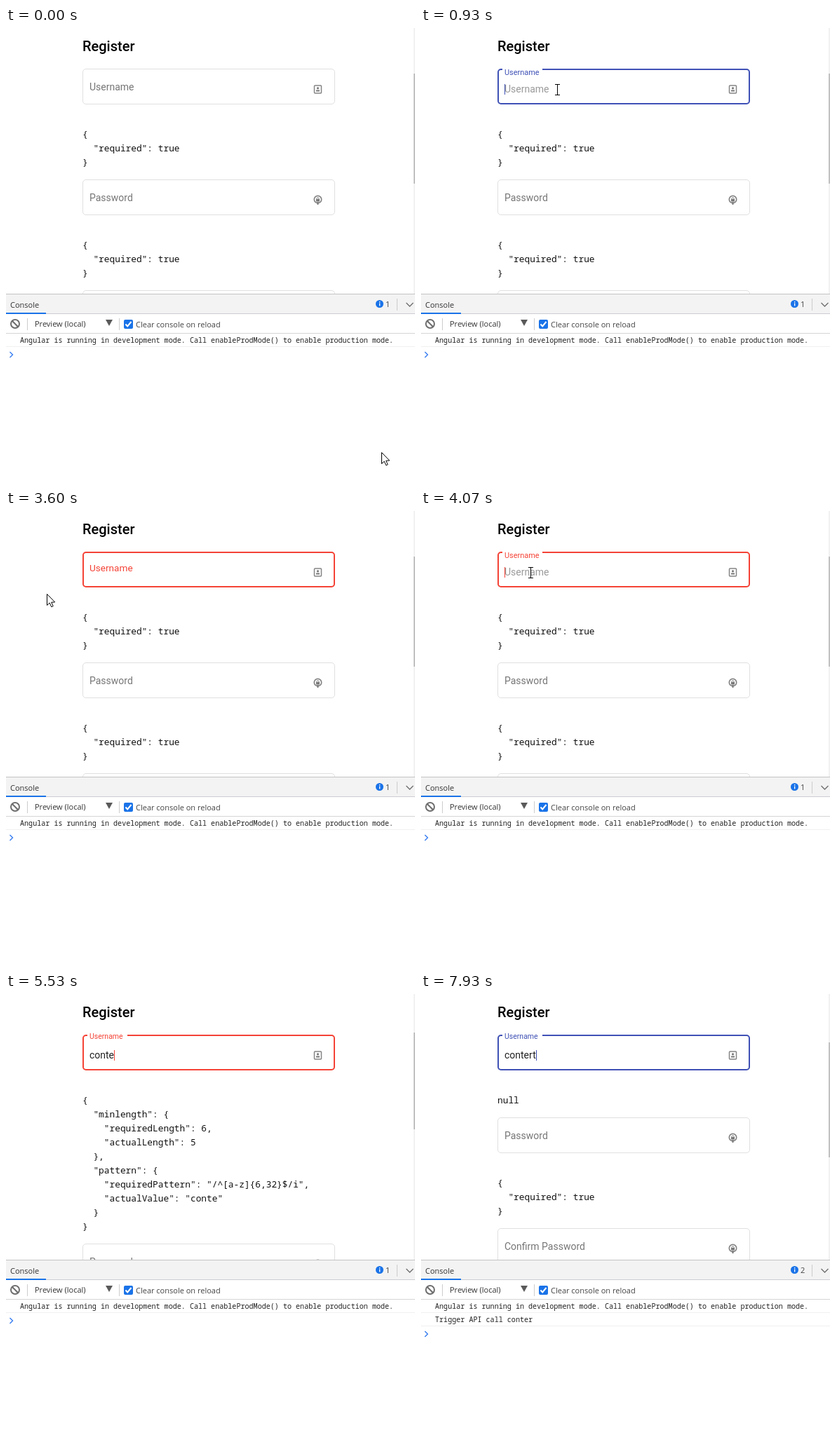
An HTML page with a canvas for the animation above (8000 ms loop, 583 by 649 pixels).

```html
<!DOCTYPE html>
<html lang="en">
<head>
<meta charset="utf-8">
<title>Register form</title>
<style>
  html, body { margin: 0; width: 100%; height: 100%; overflow: hidden; background: #fff; }
  canvas { display: block; width: 583px; height: 649px; }
</style>
</head>
<body>
<canvas id="stage" width="583" height="649"></canvas>
<script>
const g = document.getElementById('stage').getContext('2d');

const LOOP = 8000, TICK = 1000 / 15;
const UI = '"Open Sans", sans-serif', BODY = 'Roboto, sans-serif', MONO = '"Noto Sans Mono", monospace';
const PRIMARY = '#3f51b5', WARN = '#f44336', INK = 'rgba(0,0,0,.87)', BLUE = '#1a73e8';

// All moments below are counted in ticks of 1/15 s.
const FOCUS = 12, BLUR = 52, REFOCUS = 59, API_CALL = 90, BLINK = 8;
const NAME = 'contert';
const KEYS = [72, 78, 79, 80, 83, 85, 119];
const VALID_LENGTH = 6;

// Pointer trips: [tick, x, y]
const TRIPS = [
  [[0, 535, 605], [1, 528, 590], [3, 430, 390], [5, 285, 185], [7, 208, 101], [8, 198, 90],
   [10, 194, 88], [16, 194, 88], [18, 168, 95], [20, 104, 114], [22, 67, 125]],
  [[50, 0, 129], [51, 27, 124], [52, 50, 120], [54, 58, 118], [56, 80, 111], [58, 142, 92],
   [59, 154, 88], [61, 156, 88], [62, 150, 89], [63, 88, 113], [64, 16, 129]]
];

function bezier(x, x1, y1, x2, y2) {
  if (x <= 0) return 0;
  if (x >= 1) return 1;
  const at = (s, a, b) => 3 * (1 - s) ** 2 * s * a + 3 * (1 - s) * s * s * b + s ** 3;
  let lo = 0, hi = 1;
  for (let i = 0; i < 24; i++) {
    const mid = (lo + hi) / 2;
    if (at(mid, x1, x2) < x) lo = mid; else hi = mid;
  }
  return at(lo, y1, y2);
}

function text(str, x, y, font, color) {
  g.font = font;
  g.fillStyle = color;
  g.fillText(str, x, y);
}

function rect(x, y, w, h, color) {
  g.fillStyle = color;
  g.fillRect(x, y, w, h);
}

function line(points, color, width = 1, close = false) {
  g.beginPath();
  points.forEach(([x, y]) => g.lineTo(x, y));
  if (close) g.closePath();
  g.strokeStyle = color;
  g.lineWidth = width;
  g.stroke();
}

function disc(x, y, r, color) {
  g.beginPath();
  g.arc(x, y, r, 0, 7);
  g.fillStyle = color;
  g.fill();
}

function ring(x, y, r, color, width) {
  g.beginPath();
  g.arc(x, y, r, 0, 7);
  g.strokeStyle = color;
  g.lineWidth = width;
  g.stroke();
}

function outline(top, color, width) {
  g.beginPath();
  g.roundRect(109 + width / 2, top + width / 2, 360 - width, 51 - width, 5 - width / 2);
  g.strokeStyle = color;
  g.lineWidth = width;
  g.stroke();
}

function userIcon(x, y) {
  g.beginPath();
  g.roundRect(x - 5, y - 5.5, 10, 11, 1);
  g.strokeStyle = '#858585';
  g.lineWidth = 1.5;
  g.stroke();
  disc(x, y - 1.7, 1.6, '#777');
  rect(x - 2.5, y + 1, 5, 2, '#777');
}

function lockIcon(x, y) {
  ring(x, y - 0.5, 5.2, '#858585', 1.7);
  ring(x, y - 1.5, 1.6, '#777', 1);
  rect(x - 2.5, y - 1, 5, 3.5, '#777');
  rect(x - 1, y + 3, 2, 4, '#777');
}

function passwordField(label, top) {
  outline(top, '#e0e0e0', 1);
  text(label, 119, top + 31, '14px ' + BODY, 'rgba(0,0,0,.54)');
  lockIcon(444.5, top + 29);
}

function errors(lines, top) {
  lines.forEach((s, i) => text(s, 109, top + 98 + 20 * i, '12.83px ' + MONO, '#111'));
}

const REQUIRED = ['{', '  "required": true', '}'];

function nameErrors(value) {
  if (!value) return REQUIRED;
  if (value.length >= VALID_LENGTH) return ['null'];
  return ['{', '  "minlength": {', '    "requiredLength": 6,', `    "actualLength": ${value.length}`, '  },',
    '  "pattern": {', '    "requiredPattern": "/^[a-z]{6,32}$/i",', `    "actualValue": "${value}"`, '  }', '}'];
}

function pointerAt(k) {
  const trip = TRIPS.find(p => k >= p[0][0] && k <= p[p.length - 1][0]);
  if (!trip) return null;
  const i = Math.max(1, trip.findIndex(p => p[0] >= k));
  const [k0, x0, y0] = trip[i - 1], [k1, x1, y1] = trip[i];
  const u = (k - k0) / (k1 - k0);
  const x = Math.round(x0 + (x1 - x0) * u), y = Math.round(y0 + (y1 - y0) * u);
  return { x, y, inside: x >= 109 && x < 469 && y >= 58 && y < 109 };
}

function pointer({ x, y, inside }) {
  if (inside) {
    const stem = x + 0.5;
    line([[stem, y - 7], [stem, y + 8]], '#000');
    for (const end of [y - 7.5, y + 7.5]) line([[x - 3, end], [x + 4, end]], '#000');
    return;
  }
  const shape = [[0, 0], [0, 16], [3.7, 12.6], [6.3, 18.3], [8.7, 17.2], [6.2, 11.7], [11.2, 11.5]]
    .map(([dx, dy]) => [x + 0.5 + dx, y + 0.5 + dy]);
  g.beginPath();
  shape.forEach(([px, py]) => g.lineTo(px, py));
  g.fillStyle = '#fff';
  g.fill();
  line(shape, '#000', 1, true);
}

function nameField(k, value, mouse) {
  const focused = (k >= FOCUS && k < BLUR) || k >= REFOCUS;
  const invalid = k >= BLUR && value.length < VALID_LENGTH;
  const accent = invalid ? WARN : PRIMARY;
  const change = k >= REFOCUS ? REFOCUS : k >= BLUR ? BLUR : FOCUS;

  if (focused || invalid) outline(58, accent, 2);
  else {
    outline(58, '#e0e0e0', 1);
    if (mouse && mouse.inside) outline(58, k < 8 ? 'rgba(0,0,0,.45)' : INK, 2);
  }
  if (focused) rect(116, 57, 57, 4, '#fff');

  const moved = k < FOCUS ? 0 : bezier(((k - change) * TICK + 27) / 400, .25, .8, .25, 1);
  const up = change === BLUR ? 1 - moved : moved;
  text('Username', 119, 89 - 25 * up, `${14 - 3.5 * up}px ${BODY}`,
    focused || invalid ? accent : 'rgba(0,0,0,.54)');

  if (focused) {
    if (value) text(value, 119, 92, '14px ' + BODY, INK);
    else text('Username', 119, 92, '14px ' + BODY, 'rgba(0,0,0,.4)');
    const lastKey = KEYS.filter(t => t <= k).pop() || change;
    if (Math.floor((k - lastKey) / BLINK) % 2 === 0) {
      g.font = '14px ' + BODY;
      rect(Math.round(119 + g.measureText(value).width), 80, 1, 15, accent);
    }
  }
  userIcon(444.5, 87.5);
}

function page(k, value, mouse) {
  g.save();
  g.beginPath();
  g.rect(0, 0, 583, 379);
  g.clip();
  text('Register', 109, 33, '500 20px ' + BODY, '#000');
  nameField(k, value, mouse);
  const list = nameErrors(value);
  errors(list, 58);
  const top = 58 + 98 + 20 * list.length;
  passwordField('Password', top);
  errors(REQUIRED, top);
  passwordField('Confirm Password', top + 158);

  const [from, to] = list.length === 3 ? [65, 222] : list.length === 1 ? [69, 233] : [55, 193];
  rect(581, 0, 2, 379, '#f1f1f1');
  rect(581, from, 2, to - from, '#c1c1c1');
  g.restore();
}

function devtools(k) {
  const called = k >= API_CALL;
  rect(0, 379, 583, 270, '#fff');
  rect(0, 379, 583, 29, '#f3f3f3');
  rect(0, 379, 583, 1, '#c4c4c4');
  rect(0, 407, 583, 1, '#cacdd1');
  rect(0, 406, 57, 2, BLUE);
  text('Console', 6, 399, '11px ' + UI, '#333');

  disc(532.5, 393.5, 5.5, BLUE);
  rect(532, 390, 1.3, 1.5, '#fff');
  rect(532, 392.5, 1.3, 4, '#fff');
  text(called ? '2' : '1', 541, 398, '11px ' + UI, '#444');
  rect(557, 386, 1, 17, '#ccc');
  line([[570.5, 392], [575.5, 397], [580.5, 392]], '#6e6e6e', 1.3);

  ring(13, 422, 6, '#6e6e6e', 2);
  line([[8.8, 417.8], [17.2, 426.2]], '#6e6e6e', 2);
  rect(30, 414, 1, 17, '#ccc');
  text('Preview (local)', 41, 426, '11px ' + UI, '#333');
  g.beginPath();
  [[142, 416], [152, 416], [147, 425]].forEach(([x, y]) => g.lineTo(x, y));
  g.fillStyle = '#5a5a5a';
  g.fill();
  rect(161, 414, 1, 17, '#ccc');
  g.beginPath();
  g.roundRect(168, 416, 13, 13, 2);
  g.fillStyle = BLUE;
  g.fill();
  line([[170.5, 422.5], [173.2, 425.5], [178.5, 419]], '#fff', 2);
  text('Clear console on reload', 185, 427, '11px ' + UI, '#444');
  rect(0, 435, 583, 1, '#d5d5d5');

  const logs = ['Angular is running in development mode. Call enableProdMode() to enable production mode.'];
  if (called) logs.push('Trigger API call ' + NAME.slice(0, VALID_LENGTH));
  logs.forEach((s, i) => {
    text(s, 20, 449 + 19 * i, '10.08px ' + MONO, '#222');
    rect(0, 454 + 19 * i, 583, 1, '#f0f0f0');
  });
  const y = 447 + 19 * logs.length;
  line([[5.5, y - 4], [9.5, y], [5.5, y + 4]], '#367cf1', 1.4);
}

function draw(ms) {
  const k = Math.floor((ms % LOOP + 3.5) / TICK) % 120;
  const value = NAME.slice(0, KEYS.filter(t => t <= k).length);
  const mouse = pointerAt(k);
  rect(0, 0, 583, 649, '#fff');
  page(k, value, mouse);
  devtools(k);
  if (mouse) pointer(mouse);
}

let start;
function frame(now) {
  if (start === undefined) start = now;
  draw(now - start);
  requestAnimationFrame(frame);
}
draw(0);
requestAnimationFrame(frame);
</script>
</body>
</html>
```
